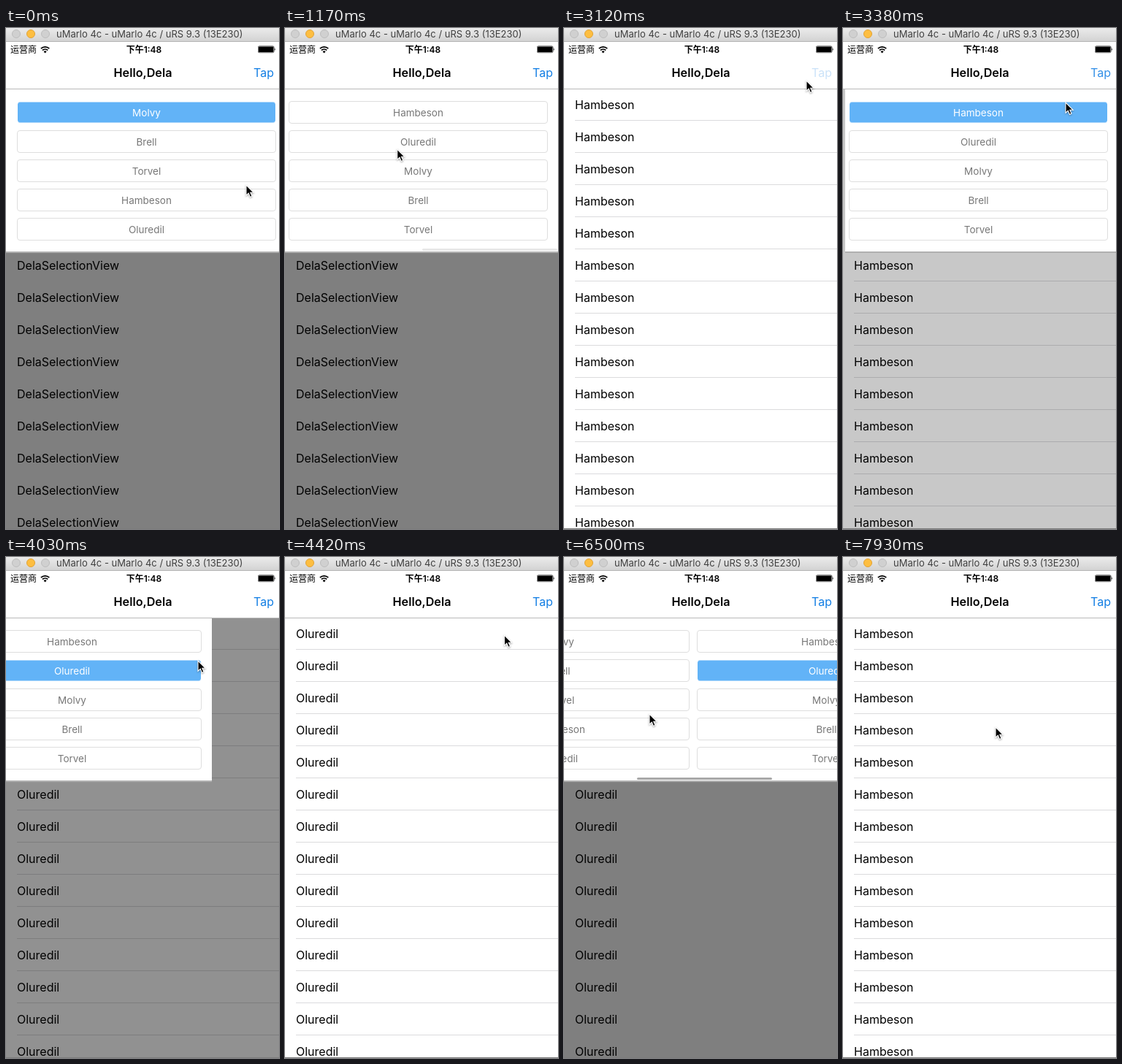
These frames come from a looping animation (374x686 px, 8000 ms). An HTML page:

```html
<!DOCTYPE html>
<html lang="zh">
<head>
<meta charset="utf-8">
<title>Selection panel</title>
<style>
  html, body { margin: 0; width: 100%; height: 100%; overflow: hidden; background: #fff; }
  body { font-family: Inter, "Noto Sans CJK SC", "Noto Sans CJK", sans-serif; color: #000; }
  #stage { position: relative; width: 374px; height: 686px; overflow: hidden; background: #fff; }
  #stage div, #stage svg { position: absolute; box-sizing: border-box; white-space: nowrap; }

  #titlebar { left: 0; top: 0; width: 374px; height: 19px; border-bottom: 1px solid #b4b4b4;
    background: linear-gradient(#ebebeb, #d3d3d3); }
  .dot { top: 2px; width: 12px; height: 12px; border-radius: 50%; background: #d0d0d0; border: 1px solid #bdbdbd; }
  .dot.on { background: #fdbe41; border-color: #e2a336; }
  #device { left: 69px; top: 0; font-size: 13px; line-height: 17px; color: #404040; }

  #bar { left: 0; top: 19px; width: 374px; height: 65px; background: #fff; border-bottom: 1px solid #b9b9b9; }
  #carrier { left: 6px; top: 2px; font-size: 12px; line-height: 18px; }
  #clock { left: 0; width: 378px; top: 2px; text-align: center; font-size: 12px; line-height: 18px; font-weight: 600; }
  #title { left: 0; width: 375px; top: 32px; text-align: center; font-size: 16.2px; line-height: 20px; font-weight: 600; }
  #tap { right: 7px; top: 32px; font-size: 16px; line-height: 20px; color: #147fe4; }

  #view { left: 0; top: 84px; width: 374px; height: 602px; overflow: hidden; }
  .row { left: 15px; width: 359px; height: 44px; font-size: 16px; line-height: 43px; }
  .row i { position: absolute; left: 0; right: 0; top: 42px; height: 1px; background: #dbdbdd; }
  #dim { inset: 0; background: #000; }
  #panel { left: 0; top: 0; width: 374px; height: 224px; overflow: hidden; background: #fff;
    border-bottom: 2px solid #b0b0b0; }
  .cell { width: 355px; height: 31px; border: 1px solid #dedede; border-radius: 4px; background: #fff;
    background-clip: padding-box; text-align: center; font-size: 13.5px; line-height: 30px; color: #777; }
  .cell.on { background-color: #62b3f7; border-color: #fff; color: #fff;
    box-shadow: inset 0 1px rgba(255,255,255,.5), inset 0 -1px rgba(255,255,255,.5); }
  #thumb { top: 218px; width: 185px; height: 3px; border-radius: 2px; background: #a8a8a8; }
  #edge { left: 0; top: 685px; width: 374px; height: 1px; background: #7c7c7c; }
  #cursor { left: -2px; top: -2px; overflow: visible; filter: drop-shadow(0 1px 1px rgba(0,0,0,.35)); }
</style>
</head>
<body>
<div id="stage">
  <div id="view">
    <div id="list"></div>
    <div id="dim"></div>
    <div id="panel"><div id="strip"></div><div id="thumb"></div></div>
  </div>
  <div id="bar">
    <div id="carrier">运营商</div>
    <svg style="left:47px;top:5px" width="14" height="11" viewBox="0 0 14 11" fill="none" stroke="#000" stroke-width="1.8">
      <path d="M.9 4.2a8.3 8.3 0 0 1 11.4 0M3 6.5a5.2 5.2 0 0 1 7.2 0"/>
      <path d="M4.6 8.2a2.9 2.9 0 0 1 4 0L6.6 10.4z" fill="#000" stroke="none"/>
    </svg>
    <div id="clock">下午1:48</div>
    <svg style="left:345px;top:5px" width="25" height="11">
      <rect x=".25" y=".75" width="22" height="9" rx="2" fill="none" stroke="#000" stroke-width=".6"/>
      <rect x="1" y="1.5" width="20.5" height="7.5" rx="1"/>
      <path d="M23 3.5q1.8 1.7 0 3.5z"/>
    </svg>
    <div id="title">Hello,Dela</div>
    <div id="tap">Tap</div>
  </div>
  <div id="titlebar">
    <div class="dot" style="left:8px"></div>
    <div class="dot on" style="left:28px"></div>
    <div class="dot" style="left:48px"></div>
    <div id="device">uMarlo 4c - uMarlo 4c / uRS 9.3 (13E230)</div>
  </div>
  <div id="edge"></div>
  <svg id="cursor" width="16" height="22" viewBox="-2 -2 16 22">
    <path d="M0 0V14.2L3.3 11.2 5.5 16.4 8 15.3 5.8 10.3H10.2Z" stroke="#fff" stroke-width="1.1"/>
  </svg>
</div>
<script>
const LOOP = 8000, STEP = 130, WIDTH = 374, PAGE = 375;
const $ = id => document.getElementById(id);
const clamp = v => Math.min(1, Math.max(0, v));

const names = ["Molvy", "Brell", "Torvel", "Hambeson", "Oluredil"];
const pages = [names, [3, 4, 0, 1, 2].map(i => names[i])];

// time, panel open
const toggles = [[-2000, true], [1886, false], [3190, true], [3986, false], [5047, true], [7590, false]];
// time, list label, selected page, selected row
const picks = [[0, "DelaSelectionView", 0, 0], [1886, names[3], 1, 0], [3986, names[4], 1, 1], [7590, names[3], 0, 3]];
// press, release
const taps = [[3040, 3190], [4870, 5035]];
const scrollPath = [[130, 0], [390, 89], [520, 179], [650, 300], [780, 360], [910, 375],
  [6240, 375], [6370, 330], [6500, 198], [6630, 55], [6760, 0]];
const cursorPath = [[0, 329, 215], [130, 329, 215], [390, 240, 215], [520, 150, 215], [780, 120, 214],
  [1300, 165, 150], [1690, 190, 115], [1886, 194, 117], [2080, 219, 149], [2500, 262, 130],
  [2990, 331, 74], [3120, 332, 72], [3250, 332, 72], [3510, 278, 132], [3640, 263, 142],
  [4160, 263, 142], [4680, 338, 72], [4810, 345, 67], [4950, 345, 67], [5200, 143, 213],
  [5720, 85, 215], [6240, 60, 215], [6370, 103, 215], [6500, 117, 215], [6760, 145, 217],
  [7410, 209, 233]];

const last = (list, t) => list.filter(e => e[0] <= t).pop();

function track(path, t, k = 1) {
  const i = path.findIndex(p => p[0] > t);
  if (i === 0) return path[0][k];
  if (i < 0) return path[path.length - 1][k];
  const a = path[i - 1], b = path[i];
  return a[k] + (b[k] - a[k]) * (t - a[0]) / (b[0] - a[0]);
}

function spring(ms) {
  if (ms > 500) return 1;
  const damp = 0.75, w = Math.sqrt(1 - damp * damp), s = ms * 0.02;
  return 1 - Math.exp(-damp * s) * (Math.cos(w * s) + damp / w * Math.sin(w * s));
}

function add(parent, cls, text, x, y) {
  const el = document.createElement("div");
  el.className = cls;
  el.style.left = x + "px";
  el.style.top = y + "px";
  el.textContent = text;
  return parent.appendChild(el);
}

const labels = [], lines = [];
for (let i = 0; i < 14; i++) {
  const row = add($("list"), "row", "", 15, i * 44);
  labels.push(row.appendChild(document.createElement("span")));
  lines.push(row.appendChild(document.createElement("i")));
}
const cells = pages.map((page, p) =>
  page.map((name, i) => add($("strip"), "cell", name, 15 + p * 365, 16 + i * 40)));

function thumbAlpha(t) {
  const fade = (from, to) => t <= from ? 0 : t <= to ? 1 : clamp(1 - (t - to) / 300);
  return Math.max(fade(130, 950), fade(6240, 6700));
}

function tapAlpha(t) {
  const tap = last(taps, t);
  return tap ? 0.22 + 0.78 * clamp((t - tap[1]) / 230) : 1;
}

function draw(t) {
  const [start, open] = last(toggles, t), age = t - start;
  const slide = spring(age), fade = clamp(age / (open ? 442 : 322));
  const dim = open ? fade : 1 - fade;
  const [, label, page, row] = last(picks, t);
  const scroll = track(scrollPath, t);

  $("panel").style.transform = `translateX(${Math.round(WIDTH * (open ? slide - 1 : -slide))}px)`;
  $("dim").style.opacity = dim / 2;
  $("strip").style.transform = `translateX(${-Math.round(scroll)}px)`;
  $("thumb").style.left = 2 + scroll / PAGE * 186 + "px";
  $("thumb").style.opacity = thumbAlpha(t);
  $("tap").style.opacity = tapAlpha(t);
  $("cursor").style.transform = `translate(${track(cursorPath, t, 1)}px, ${track(cursorPath, t, 2)}px)`;

  for (const el of labels) el.textContent = label;
  for (const el of lines) el.style.opacity = dim < 1 ? 1 : 0;
  cells.forEach((col, p) => col.forEach((el, i) => el.classList.toggle("on", p === page && i === row)));
}

let shown = -1;
const begin = performance.now();
function tick(now) {
  const t = Math.floor(Math.max(0, now - begin) % LOOP / STEP) * STEP;
  if (t !== shown) draw(shown = t);
  requestAnimationFrame(tick);
}
draw(0);
requestAnimationFrame(tick);
</script>
</body>
</html>
```
